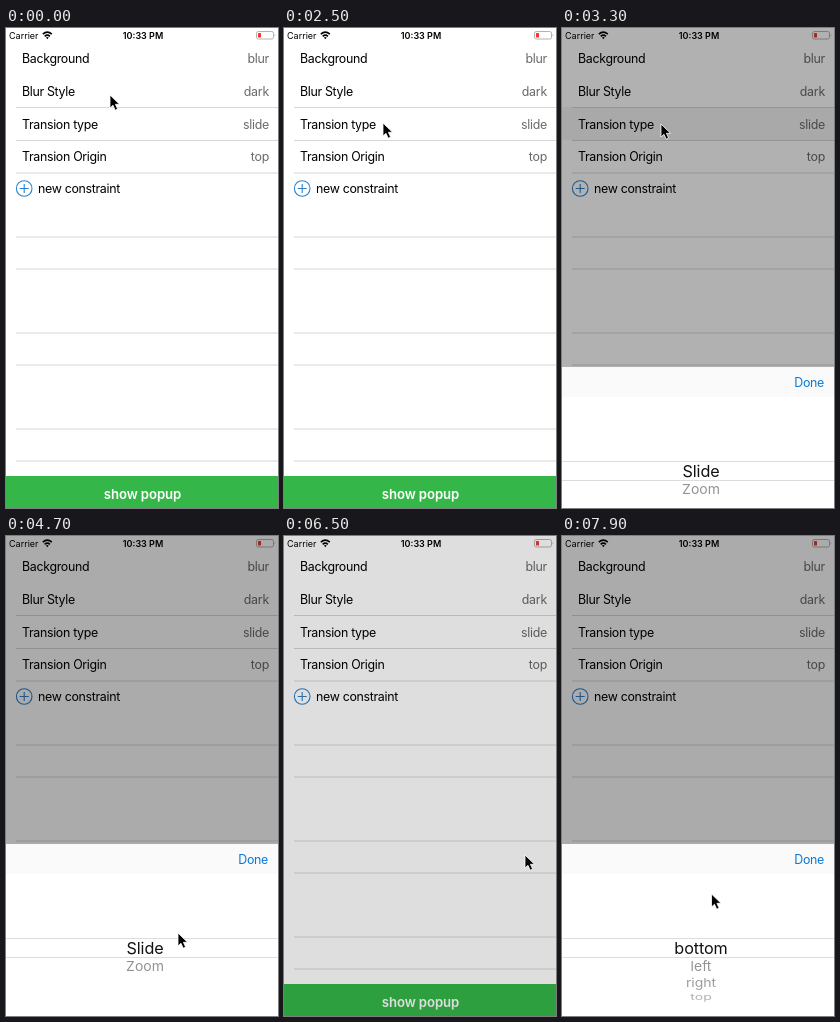
Animation of 272 by 480 pixels, one loop 8 s. Source, as an HTML page:

```html
<!DOCTYPE html>
<html lang="en">
<head>
<meta charset="utf-8">
<title>Popup settings</title>
<style>
  html, body { margin: 0; width: 100%; height: 100%; overflow: hidden; background: #fff; }
  svg { display: block; width: 100vw; height: 100vh; }
  text { font: 12.4px Inter, Roboto, "Liberation Sans", sans-serif; letter-spacing: -.32px; }
  .value { fill: #6a6a6a; text-anchor: end; letter-spacing: -.25px; }
  .status { font-size: 9px; letter-spacing: 0; }
  .bold { font-weight: 600; text-anchor: middle; }
  .button { font-size: 13.2px; letter-spacing: -.1px; fill: #fff; }
  .done { fill: #0a78d8; text-anchor: end; }
  .option { font-size: 14px; letter-spacing: 0; text-anchor: middle; }
  .option.current { font-size: 16.2px; letter-spacing: -.1px; }
</style>
</head>
<body>
<svg viewBox="0 0 272 480" preserveAspectRatio="none">
  <rect width="272" height="480" fill="#fff"/>
  <rect id="highlight" width="272" height="33" fill="#d8d8d8"/>
  <g id="list"></g>
  <g fill="none" stroke="#2c82cb" stroke-width="1.1">
    <circle cx="18.2" cy="160.5" r="7.8"/>
    <path d="M13.7 160.5H22.7M18.2 156V165"/>
  </g>
  <text x="32" y="165">new constraint</text>

  <text class="status" x="3" y="11">Carrier</text>
  <g fill="none" stroke="#000" stroke-width="1.6">
    <path d="M36.8 6.2Q41.3 2.2 45.8 6.2M38.7 8.3Q41.3 6 43.9 8.3"/>
  </g>
  <path d="M39.9 9.5Q41.3 8.5 42.7 9.5L41.3 11.2Z"/>
  <text class="status bold" x="137" y="11">10:33 PM</text>
  <rect x="250.5" y="3.5" width="17" height="7.5" rx="1.8" fill="none" stroke="#aaa" stroke-width=".9"/>
  <rect x="252" y="5" width="3" height="4.5" rx=".5" fill="#f5372f"/>
  <path d="M268.6 5.8Q270.2 7.2 268.6 8.7Z" fill="#aaa"/>

  <rect y="448" width="272" height="32" fill="#35b648"/>
  <text class="bold button" x="136.5" y="471">show popup</text>

  <rect id="dim" width="272" height="480"/>
  <g id="sheet">
    <rect y="308" width="272" height="172" fill="#fff"/>
    <rect y="308" width="272" height="30" fill="#fafafa"/>
    <text class="done" x="262" y="328">Done</text>
    <path d="M0 402.5H272M0 421.5H272" stroke="#dcdcdc"/>
    <g id="typePicker"></g>
    <g id="originPicker"></g>
  </g>
  <path id="cursor" d="M0 0V13L3 10.3L5.2 15.2L7.6 14.1L5.4 9.3H9.5Z" stroke="#fff" stroke-width=".8"/>
</svg>
<script>
const LOOP = 8000, STEP = 100, SHEET_HEIGHT = 173, DIM = 0.33;
const $ = id => document.getElementById(id);
const clamp = v => Math.max(0, Math.min(1, v));

function add(parent, tag, attrs, label = "") {
  const el = document.createElementNS("http://www.w3.org/2000/svg", tag);
  for (const key in attrs) el.setAttribute(key, attrs[key]);
  el.textContent = label;
  parent.append(el);
}

const rows = [["Background", "blur"], ["Blur Style", "dark"],
              ["Transion type", "slide"], ["Transion Origin", "top"]];
rows.forEach(([name, value], i) => {
  const y = Math.round(35 + i * 32.8);
  add($("list"), "text", { x: 16, y }, name);
  add($("list"), "text", { x: 263, y, class: "value" }, value);
});
for (const y of [79, 112, 144.5, 208.5, 240.5, 304.5, 336.5, 400.5, 432.5])
  add($("list"), "path", { d: `M10 ${y + 0.5}H272`, stroke: "#d6d6d8" });

// Options sit on a wheel that turns away below the selected one.
function buildPicker(group, options) {
  options.forEach((label, i) => {
    const angle = i * 0.29, y = 412 + 64 * Math.sin(angle);
    add(group, "text", {
      class: i ? "option" : "option current",
      y: i ? 5 : 6,
      fill: ["#111", "#929292", "#9c9c9c", "#b0b0b0"][i],
      transform: `translate(139 ${y}) scale(1 ${Math.cos(angle)})`
    }, label);
  });
}
buildPicker($("typePicker"), ["Slide", "Zoom"]);
buildPicker($("originPicker"), ["bottom", "left", "right", "top"]);

// time, x, y
const cursorPath = [
  [0, 104, 67], [900, 104, 67], [2100, 99, 95], [2500, 99, 95], [3300, 99, 96],
  [3500, 99, 97], [4200, 167, 418], [4500, 171, 407], [4700, 172, 397],
  [5400, 197, 355], [6200, 241, 319], [6600, 241, 319], [7100, 157, 125],
  [7400, 157, 125], [7800, 149.5, 358], [8000, 149.5, 358]
];

function cursorAt(t) {
  const next = cursorPath.findIndex(p => p[0] > t);
  const [t0, x0, y0] = cursorPath[next - 1], [t1, x1, y1] = cursorPath[next];
  const k = (t - t0) / (t1 - t0);
  return [x0 + (x1 - x0) * k, y0 + (y1 - y0) * k];
}

function spring(ms) {
  const s = Math.max(0, ms) * 0.013;
  return 1 - (1 + s) * Math.exp(-s);
}

function render(t) {
  const second = t >= 7000;
  const opened = t - (second ? 7260 : 3060);
  const pressed = t - (second ? 7200 : 2900);
  const closing = second ? 0 : Math.max(0, t - 6330);

  const rise = spring(opened) * (1 - clamp(closing / 170));
  // The shade lags until the sheet is visibly on its way.
  const shade = clamp(spring(opened - (second ? 40 : 0)) * 1.14) * (1 - clamp(closing / 280));
  $("sheet").setAttribute("transform", `translate(0 ${Math.round(SHEET_HEIGHT * (1 - rise))})`);
  $("dim").setAttribute("opacity", DIM * shade);
  $("typePicker").setAttribute("visibility", second ? "hidden" : "visible");
  $("originPicker").setAttribute("visibility", second ? "visible" : "hidden");

  $("highlight").setAttribute("y", second ? 112 : 79);
  $("highlight").setAttribute("opacity", pressed < 0 ? 0 : 1 - clamp((pressed - 250) / 220));
  $("cursor").setAttribute("transform", `translate(${cursorAt(t)})`);
}

const start = performance.now();
function tick() {
  const t = (performance.now() - start) % LOOP;
  render(Math.floor(t / STEP) * STEP);
  requestAnimationFrame(tick);
}
tick();
</script>
</body>
</html>
```
